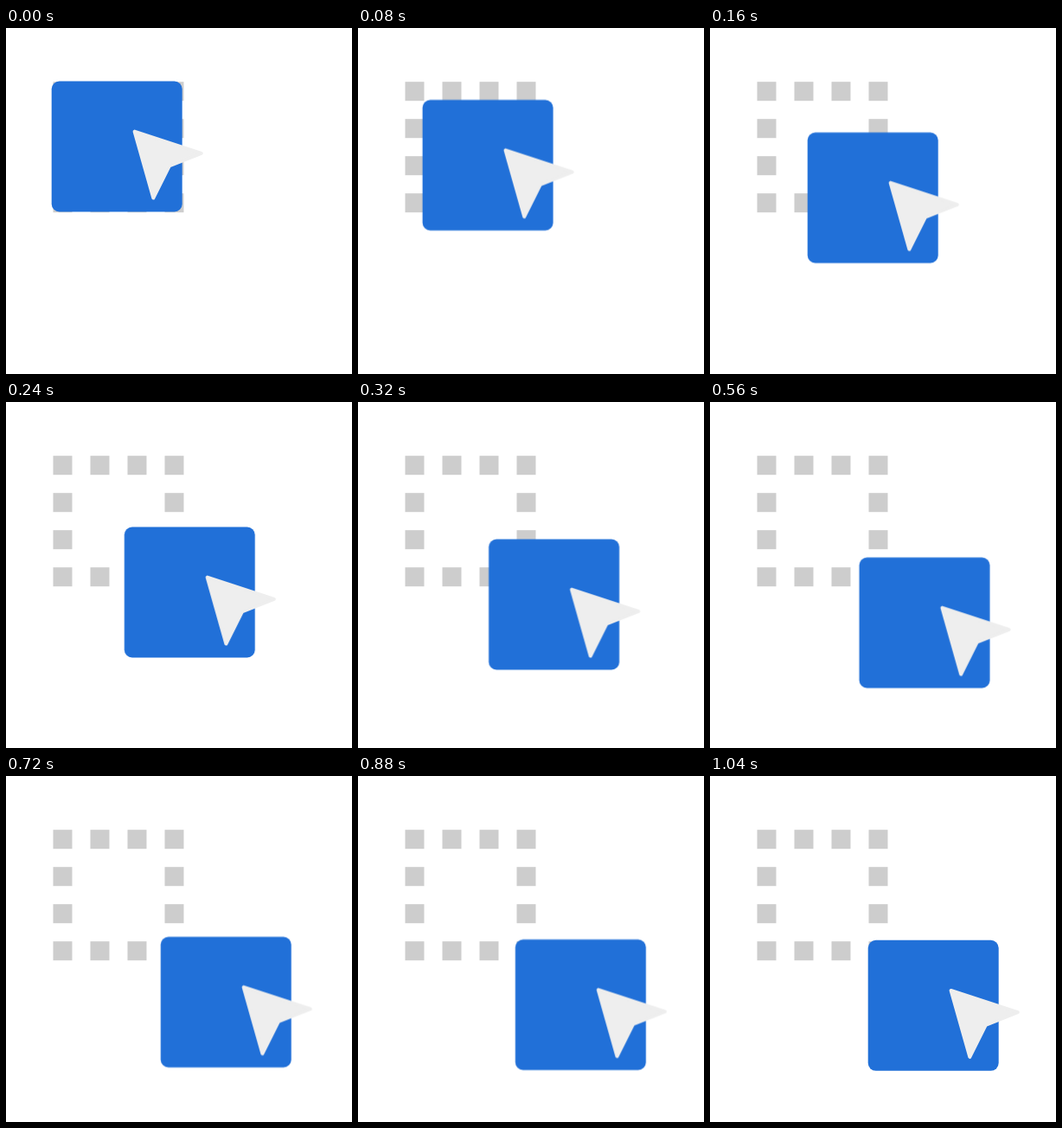
Recreate the animation shown at these times as an HTML page. Size 400x400 px, loop 1640 ms.

```html
<!DOCTYPE html>
<html lang="en">
<head>
<meta charset="utf-8">
<title>Drag and drop</title>
<style>
  html, body { margin: 0; width: 100%; height: 100%; overflow: hidden; background: #fff; }
  svg { display: block; width: 100%; height: 100%; }

  /* Paused: the script sets the time through a negative delay */
  #dragged { animation: drag 1040ms cubic-bezier(.2, .25, .01, 1) both paused; }

  @keyframes drag {
    from { transform: translate(0, 0); }
    to { transform: translate(130px, 128.3px); }
  }
</style>
</head>
<body>
<svg viewBox="0 0 400 400">
  <g id="outline" fill="#cdcdcd"></g>
  <g id="dragged">
    <rect x="52.7" y="61.5" width="151" height="151" rx="9" fill="#2170d8"/>
    <path d="M148.6 119.6 L225.8 144.8 L188.8 159.5 L170.3 196.5 Z"
          fill="#eee" stroke="#eee" stroke-width="4" stroke-linejoin="round"/>
  </g>
</svg>
<script>
  const LOOP = 1640, STEP = 40;
  const SIDE = 4, DASH = 22, PITCH = 43;

  const outline = document.getElementById('outline');
  const dragged = document.getElementById('dragged');

  function addDash(col, row) {
    const dash = document.createElementNS('http://www.w3.org/2000/svg', 'rect');
    dash.setAttribute('x', 54.5 + col * PITCH);
    dash.setAttribute('y', 62.2 + row * PITCH);
    dash.setAttribute('width', DASH);
    dash.setAttribute('height', DASH);
    outline.append(dash);
  }

  for (let row = 0; row < SIDE; row++) {
    for (let col = 0; col < SIDE; col++) {
      const onEdge = row % (SIDE - 1) === 0 || col % (SIDE - 1) === 0;
      if (onEdge) addDash(col, row);
    }
  }

  const start = performance.now();

  // The pose holds for STEP ms at a time
  function draw() {
    const t = Math.max(0, performance.now() - start) % LOOP;
    dragged.style.animationDelay = `${-Math.floor(t / STEP) * STEP}ms`;
    requestAnimationFrame(draw);
  }
  draw();
</script>
</body>
</html>
```
